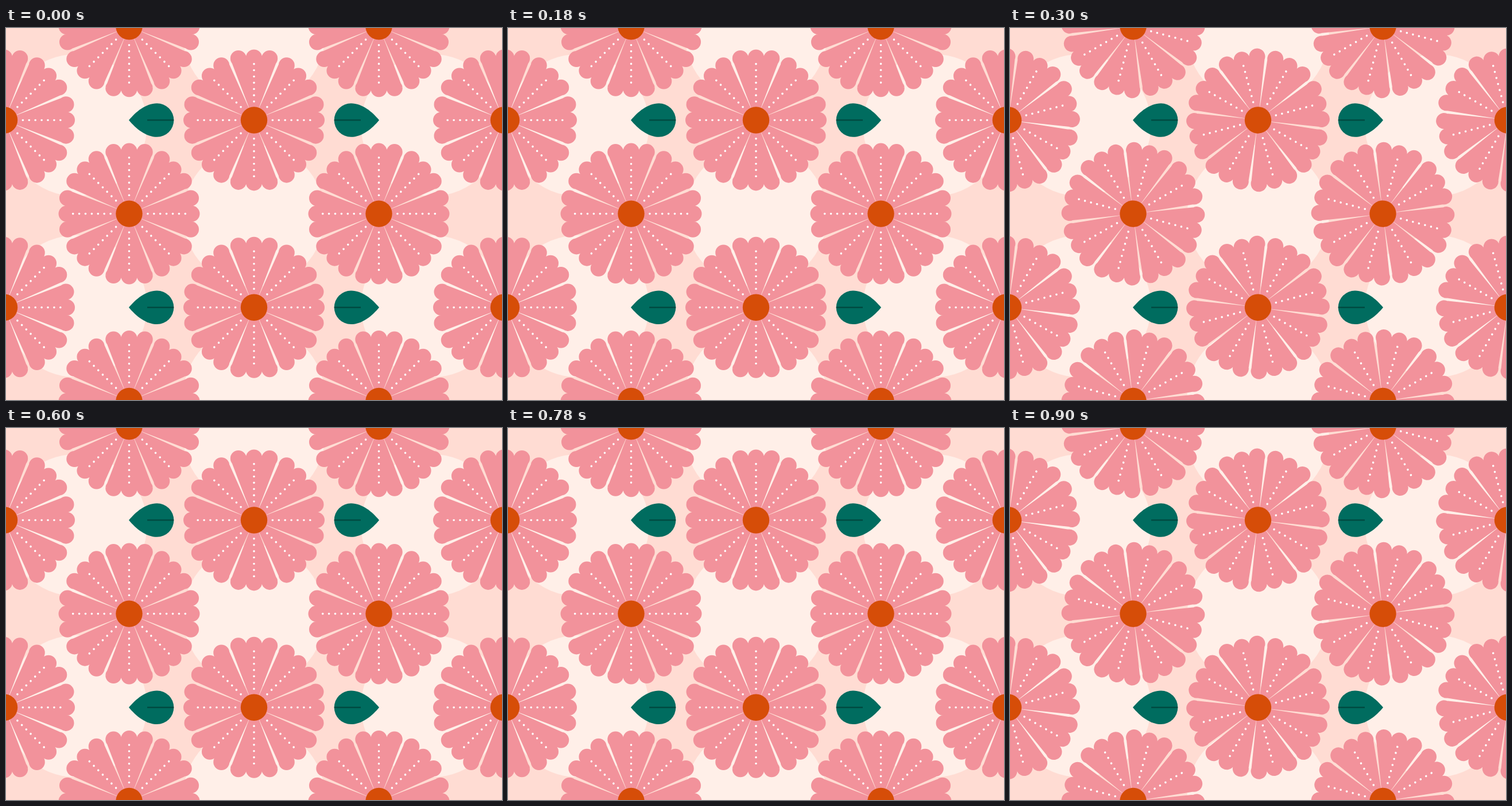
An HTML page with a canvas for the animation above (1.2 s loop, 864 px wide and 648 px high).

```html
<!DOCTYPE html>
<html lang="en">
<head>
<meta charset="utf-8">
<title>Turning flowers</title>
<style>
  html, body { margin: 0; width: 100%; height: 100%; overflow: hidden; background: #ffdcd3; }
  canvas { display: block; width: 864px; height: 648px; }
</style>
</head>
<body>
<canvas id="stage" width="864" height="648"></canvas>
<script>
const ctx = document.getElementById('stage').getContext('2d');
const W = 864, H = 648, CX = 432;
const STEP = 300, TURN = Math.PI / 12;
const COL = 217.5, ROW = 163.15, MID = 323.6;
const colors = {
  peach: '#ffdcd3', cream: '#ffefe8', pink: '#f2929b', dot: '#ffffff',
  core: '#d64d08', leaf: '#006c5f', vein: '#004a41'
};

function disc(x, y, r, color) {
  ctx.fillStyle = color;
  ctx.beginPath();
  ctx.arc(x, y, r, 0, Math.PI * 2);
  ctx.fill();
}

// One petal pointing up: a wedge whose sides touch the outer two of three lobes.
function makePetal() {
  const p = new Path2D();
  const r = 14, x = 27.2, y = -107.5;
  const baseX = 5.6, baseY = -13.6;
  const dx = x - baseX, dy = y - baseY;
  const a = Math.atan2(dy, dx) + Math.PI / 2 - Math.asin(r / Math.hypot(dx, dy));
  const tx = x + r * Math.cos(a), ty = y + r * Math.sin(a);
  p.moveTo(0, 0);
  p.lineTo(-baseX, baseY);
  p.lineTo(-tx, ty);
  p.lineTo(-x, y);
  p.lineTo(x, y);
  p.lineTo(tx, ty);
  p.lineTo(baseX, baseY);
  p.closePath();
  for (const [lx, ly] of [[-x, y], [0, -109], [x, y]]) {
    p.moveTo(lx + r, ly);
    p.arc(lx, ly, r, 0, Math.PI * 2);
  }
  return p;
}
const petal = makePetal();

function flower(x, y, angle) {
  ctx.save();
  ctx.translate(x, y);
  ctx.rotate(angle);
  for (let i = 0; i < 8; i++) {
    ctx.fillStyle = colors.pink;
    ctx.fill(petal);
    for (let k = 0; k < 7; k++) disc(0, -32.4 - k * 10.9, 1.8, colors.dot);
    ctx.rotate(Math.PI / 4);
  }
  disc(0, 0, 23.2, colors.core);
  ctx.restore();
}

// Leaf with its tip at (x, y); dir is the side the round end lies on.
function leaf(x, y, dir) {
  const r = 29.3;
  ctx.save();
  ctx.translate(x, y);
  ctx.scale(dir, 1);
  ctx.fillStyle = colors.leaf;
  ctx.beginPath();
  ctx.moveTo(0, 0);
  ctx.bezierCurveTo(12, -14.5, 29.5, -r, 49, -r);
  ctx.arc(49, 0, r, -Math.PI / 2, Math.PI / 2);
  ctx.bezierCurveTo(29.5, r, 12, 14.5, 0, 0);
  ctx.fill();
  ctx.fillStyle = colors.vein;
  ctx.fillRect(32, -1.2, 46.2, 2.4);
  ctx.restore();
}

function backdrop() {
  ctx.fillStyle = colors.peach;
  ctx.fillRect(0, 0, W, H);
  for (let i = -1; i <= 1; i++) {
    for (let j = -2; j <= 2; j++) {
      if ((i + j) % 2 === 0) disc(CX + i * 310, 327 + j * 157.7, 123.6, colors.cream);
    }
  }
}

function draw(time) {
  const turned = Math.floor(time / STEP) % 2;
  backdrop();
  for (const j of [-1, 1]) {
    const y = MID + j * ROW;
    leaf(CX - 218, y, 1);
    leaf(CX + 218, y, -1);
  }
  for (let i = -2; i <= 2; i++) {
    for (let j = -2; j <= 2; j++) {
      if ((i + j) % 2 === 0) continue;
      const dir = i % 2 === 0 ? -1 : 1;
      flower(CX + i * COL, MID + j * ROW, dir * turned * TURN);
    }
  }
}

let start;
function tick(now) {
  if (start === undefined) start = now;
  draw(now - start);
  requestAnimationFrame(tick);
}
draw(0);
requestAnimationFrame(tick);
</script>
</body>
</html>
```
